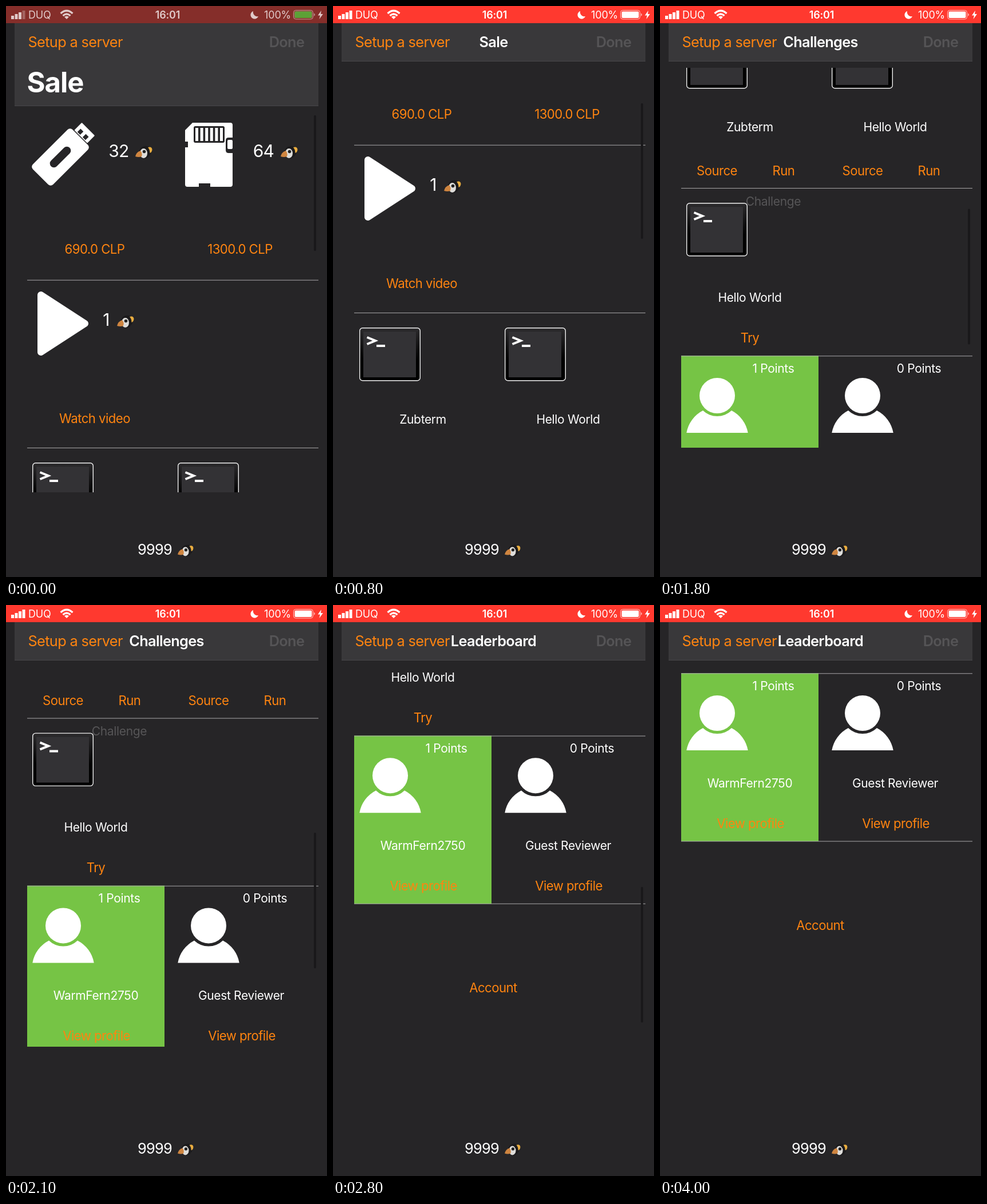
An HTML page that plays this animation: 561 by 998 pixels, repeating every 4.1 s.

```html
<!DOCTYPE html>
<html lang="en">
<head>
<meta charset="utf-8">
<title>Shop scroll</title>
<style>
  html, body { margin: 0; width: 100%; height: 100%; overflow: hidden; background: #262527; }
  svg { display: block; }
  text { font: 22.2px Inter, sans-serif; letter-spacing: -.025em; fill: #fff; }
  .mid text, text.mid { text-anchor: middle; }
  .link text, text.link { fill: #ff8410; }
  .name text { font-size: 21px; letter-spacing: -.016em; }
  .count text { font-size: 30px; }
  .bar text { font-size: 25.3px; }
  .off { opacity: .14; }
  .bold { font-weight: 600 !important; }
  .status text { font-size: 18px; letter-spacing: -.008em; }
</style>
</head>
<body>
<svg width="561" height="998" viewBox="0 0 561 998">
  <defs>
    <linearGradient id="frame" x2="0" y2="1">
      <stop stop-color="#2c2b2d"/><stop offset=".6" stop-color="#000"/>
    </linearGradient>
    <g id="bird">
      <path d="M7 11C8 4 14 1 20 2C27 3 29 9 27 15C25 20 20 24 14 24L8 20Z" fill="#1b1a1c"/>
      <ellipse cx="14.500" cy="14.500" rx="6.500" ry="8.500" fill="#deddda"/>
      <path d="M22 4Q29 2 29.500 8Q29 13 25.500 14Q25.500 8 22 4Z" fill="#e9ad40"/>
      <path d="M0 20Q2 12 9 10Q13 14 11 20Q6 22 0 20Z" fill="#cf8540"/>
      <circle cx="15.500" cy="11.500" r="2.800" fill="#222"/>
    </g>
    <g id="terminal">
      <rect x=".7" y=".7" width="105.600" height="92" rx="5" fill="url(#frame)" stroke="#f0f0f0" stroke-width="1.400"/>
      <rect x="7" y="7" width="92" height="80" fill="#333235"/>
      <path d="M13.500 17L28 23L13.500 29M30 32H45" fill="none" stroke="#fff" stroke-width="4"/>
    </g>
    <g id="person" fill="#fff">
      <circle cx="54" cy="31" r="31"/>
      <path d="M.3 96A54.500 54.500 0 0 1 29 57A36 36 0 0 0 79 57A54.500 54.500 0 0 1 107.700 96Z"/>
    </g>
  </defs>

  <rect width="561" height="998" fill="#262527"/>

  <svg id="list" width="561" height="664">
    <g id="content">
      <g transform="translate(95 264) rotate(-45)" fill="#fff">
        <rect x="-49" y="-25" width="98" height="50" rx="6"/>
        <rect x="50.500" y="-16" width="18.500" height="32" rx="1"/>
        <path d="M-16 0H16" stroke="#262527" stroke-width="14" stroke-linecap="round"/>
        <path d="M52 -6.500H60M52 6.500H60" stroke="#262527" stroke-width="7"/>
      </g>
      <g fill="#fff">
        <path d="M326 204H392Q396 204 396 208V312Q396 316 392 316H357V310H337V316H317Q313 316 313 312V247H318V237H313V217Z"/>
        <path d="M396 230H389Q384 230 384 235V252Q384 257 389 257H396" fill="#262527"/>
        <rect x="387" y="234" width="9" height="16" rx="2"/>
        <rect x="328" y="210" width="54" height="29" rx="3" fill="#262527"/>
        <path d="M331 224.500H379" stroke="#fff" stroke-width="23" stroke-dasharray="5 3.600"/>
        <path d="M61 505L138 555L61 605Z" stroke="#fff" stroke-width="12" stroke-linejoin="round"/>
      </g>
      <g class="mid count">
        <text x="197" y="264">32</text><text x="450" y="264">64</text><text x="175" y="559">1</text>
      </g>
      <use href="#bird" x="226" y="243"/><use href="#bird" x="480" y="243"/><use href="#bird" x="194" y="539"/>

      <use href="#terminal" x="46" y="798"/><use href="#terminal" x="300" y="798"/><use href="#terminal" x="46" y="1091"/>
      <rect x="37" y="1358" width="240" height="294" fill="#76c445"/>
      <use href="#person" x="46" y="1397"/><use href="#person" x="300" y="1397"/>
      <path d="M37 479.200H546m-509 293.200h509m-509 293.200h509m-509 293.200h509m-509 293.200h509" stroke="#aaa9ab"/>

      <g class="mid name">
        <text x="157" y="966">Zubterm</text><text x="411" y="966">Hello World</text>
        <text x="198" y="1096" opacity=".22">Challenge</text>
        <text x="157" y="1264">Hello World</text>
        <text x="198" y="1388">1 Points</text><text x="452.500" y="1388">0 Points</text>
        <text x="157" y="1558">WarmFern2750</text><text x="411" y="1558">Guest Reviewer</text>
      </g>
      <g class="mid link">
        <text x="155" y="433">690.0 CLP</text><text x="409" y="433">1300.0 CLP</text>
        <text x="155" y="729">Watch video</text>
        <text x="99.500" y="1043">Source</text><text x="216" y="1043">Run</text>
        <text x="354" y="1043">Source</text><text x="470" y="1043">Run</text>
        <text x="157" y="1335">Try</text>
        <text x="158" y="1629">View profile</text><text x="412" y="1629">View profile</text>
        <text x="280" y="1807">Account</text>
      </g>
    </g>
  </svg>
  <rect id="thumb" x="538" width="4" height="237" rx="2" fill="#19181a"/>

  <g class="bar">
    <rect id="header" x="15" y="30" width="531" fill="#39383a"/>
    <rect id="edge" x="15" width="531" height="1" fill="#48474a"/>
    <svg id="large" y="97" width="561">
      <text id="largeTitle" x="36.500" style="font-size:49px;font-weight:700;letter-spacing:-.02em">Sale</text>
    </svg>
    <text class="link" x="38.500" y="72">Setup a server</text>
    <text id="title" class="mid bold" x="280.500" y="72"></text>
    <text class="mid bold off" x="490.500" y="72">Done</text>
    <text class="mid" x="260" y="959">9999</text>
    <use href="#bird" transform="translate(300 940) scale(.93)"/>
  </g>

  <rect id="statusBack" width="561" height="30" fill="#ff392f"/>
  <g id="status" class="status" fill="#fff">
    <path d="M9 17h5v6h-5zM15.500 14h5v9h-5zM22 11h5v12h-5z"/>
    <path id="lastBar" d="M28.500 8h5v15h-5z"/>
    <text x="39" y="22">DUQ</text>
    <path d="M95.500 13Q106 3.500 116.500 13M99.500 17Q106 11 112.500 17" fill="none" stroke="#fff" stroke-width="3.200"/>
    <path d="M102 19Q106 16 110 19L106 23Z"/>
    <text class="mid bold" x="282.500" y="22">16:01</text>
    <path d="M432 9A7 7 0 1 0 441 18A7.500 7.500 0 0 1 432 9Z"/>
    <text x="451" y="22">100%</text>
    <rect x="502.500" y="7.500" width="34" height="15.500" rx="4" fill="none" stroke="#fff" stroke-opacity=".7"/>
    <rect x="504.500" y="9.500" width="30" height="11.500" rx="2"/>
    <rect id="green" x="504.500" y="9.500" width="30" height="11.500" rx="2" fill="#4fc83a"/>
    <path d="M538.500 12.500Q541 15.200 538.500 18Z"/>
    <path d="M551 8L545 16.500H549L547.500 23L554 14H550Z"/>
  </g>
</svg>
<script>
  const LOOP = 4100, STEP = 100;
  const times = [0, 500, 1200, 1800, 2400, 3200, 4000];
  const offsets = [0, 139, 391, 747, 971, 1226, 1239];
  const $ = id => document.getElementById(id);
  const clamp = v => Math.min(1, Math.max(0, v));
  const set = (id, attrs) => {
    for (const key in attrs) $(id).setAttribute(key, attrs[key]);
  };

  // Monotone cubic through the scroll stops.
  const speeds = offsets.slice(1).map((y, i) => (y - offsets[i]) / (times[i + 1] - times[i]));
  const slopes = times.map((_, i) => {
    const a = speeds[i - 1], b = speeds[i];
    return a && b ? 2 * a * b / (a + b) : 0;
  });
  function scrollAt(t) {
    if (t >= times.at(-1)) return offsets.at(-1);
    const i = times.findIndex(end => end > t) - 1;
    const span = times[i + 1] - times[i], u = (t - times[i]) / span, v = 1 - u;
    return v * v * ((1 + 2 * u) * offsets[i] + u * span * slopes[i])
         + u * u * ((3 - 2 * u) * offsets[i + 1] - v * span * slopes[i + 1]);
  }

  function titleAt(scroll) {
    if (scroll < 293) return 'Sale';
    if (scroll < 586) return 'Programs';
    return scroll < 880 ? 'Challenges' : 'Leaderboard';
  }

  function draw(t) {
    const scroll = scrollAt(t);
    const collapse = Math.min(78, scroll), bottom = 175 - collapse, top = bottom + 11;
    set('list', { y: top });
    set('content', { transform: `translate(0 ${-scroll - top})` });
    set('thumb', { y: top + 5 + .361 * (scroll - collapse), opacity: clamp((3900 - t) / 300) });
    set('header', { height: bottom - 30 });
    set('edge', { y: bottom - 1 });
    set('large', { height: bottom - 97 });
    set('largeTitle', { y: 54 - collapse });
    $('title').textContent = titleAt(scroll);
    set('title', { opacity: clamp((t - 465) / 250) });

    const dim = clamp(1 - t / 200);
    set('statusBack', { opacity: 1 - .56 * dim });
    set('status', { opacity: 1 - .25 * dim });
    set('lastBar', { opacity: 1 - .65 * dim });
    set('green', { opacity: dim });
  }

  function tick() {
    draw(Math.floor(performance.now() % LOOP / STEP) * STEP);
    requestAnimationFrame(tick);
  }
  tick();
</script>
</body>
</html>
```
